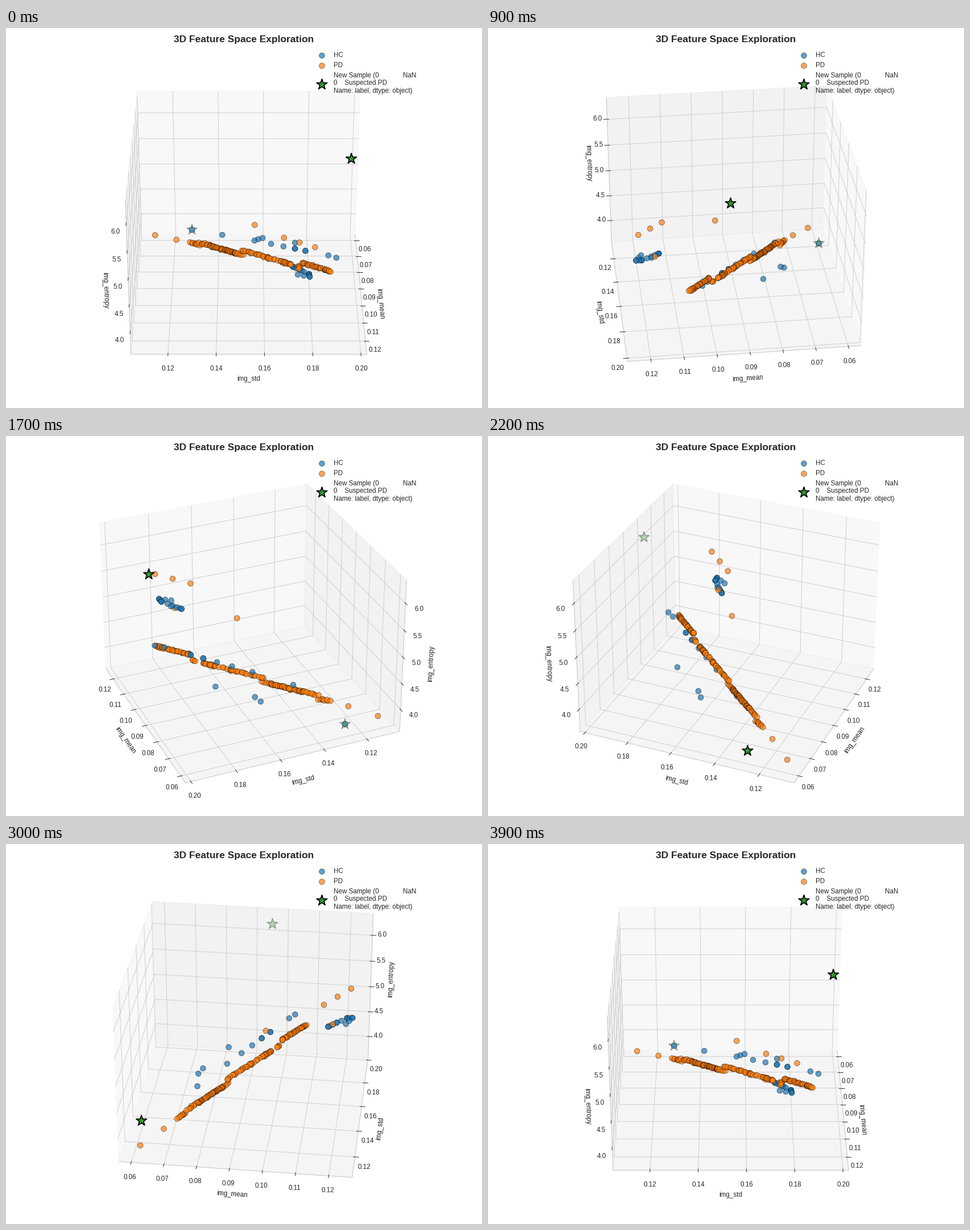
A matplotlib script for the animation above (4000 ms loop, 837 px wide and 669 px high).

```python
import numpy as np
import matplotlib.pyplot as plt
from matplotlib.animation import FuncAnimation

W, H, DPI = 837, 669, 83.7
FRAMES, INTERVAL = 40, 100
SIDE = 625  # side of the square axes in pixels

plt.style.use("seaborn-v0_8-whitegrid")
plt.rcParams["font.family"] = "sans-serif"
plt.rcParams["font.sans-serif"] = ["Liberation Sans", "DejaVu Sans"]

rng = np.random.default_rng(4)


def along(start, end, t):
    a, b = np.array(start), np.array(end)
    return a + np.asarray(t)[:, None] * (b - a)


def line(start, end, count=2, bend=1.0):
    """Regular points from start to end; bend shifts them along the line."""
    return along(start, end, np.linspace(0, 1, count) ** bend)


def band(start, end, count, shape=1.0):
    """Random points between start and end with a little scatter."""
    t = rng.beta(shape, shape, count)
    t[:2] = 0, 1
    noise = rng.normal(0, 1, (count, 3)) * (0.00008, 0.00012, 0.007)
    return along(start, end, t) + noise


# Key points: img_mean, img_std, img_entropy
near_star = (0.0604, 0.1277, 3.806)
far_star = (0.0954, 0.1962, 6.232)
rise_mid, rise_top = (0.0940, 0.1734, 4.493), (0.0964, 0.1777, 4.526)
clump_a, clump_b = (0.1152, 0.1717, 4.832), (0.1208, 0.1782, 4.876)
clump_c = (0.1225, 0.1784, 4.884)

stars = line(near_star, far_star)

healthy = np.vstack([
    line(near_star, (0.0765, 0.1418, 4.207)),
    line((0.0751, 0.1577, 4.076), (0.0764, 0.1596, 4.141)),
    line((0.0833, 0.1737, 4.266), rise_mid),
    line((0.0845, 0.1560, 4.347), rise_top, 5, bend=0.8),
    line(rise_top, (0.1034, 0.1905, 4.618)),
    line((0.1017, 0.1872, 4.608), clump_a),
    line(clump_a, clump_b, 6, bend=1.6),
    line((0.1177, 0.1753, 4.844), clump_b),
    line(clump_b, clump_c, 3),
    line(clump_c, (0.1207, 0.1736, 4.863), 3),
])

patients = np.vstack([
    line((0.0621, 0.1110, 3.748), (0.0682, 0.1210, 3.847)),
    line((0.0967, 0.1560, 5.033), (0.1165, 0.1741, 4.834)),
    line((0.1139, 0.1680, 5.330), (0.1217, 0.1804, 5.405), 3),
    band((0.0717, 0.1273, 3.905), (0.0737, 0.1315, 3.911), 9),
    band((0.0740, 0.1312, 3.974), (0.0853, 0.1510, 4.085), 66, 1.5),
    band((0.0849, 0.1506, 4.168), (0.0971, 0.1716, 4.286), 44),
    band((0.0989, 0.1745, 4.302), (0.0994, 0.1754, 4.303), 4),
    band((0.1003, 0.1765, 4.414), (0.1072, 0.1882, 4.478), 38),
])

fig = plt.figure(figsize=(W / DPI, (H + 0.001) / DPI), dpi=DPI)
ax = fig.add_axes([(W - SIDE) / 2 / W, 12.4 / H, SIDE / W, SIDE / H],
                  projection="3d")

dots = dict(s=70, alpha=0.7, edgecolors="k", linewidths=0.5)
ax.scatter(*healthy.T, c="#1f77b4", label="HC", **dots)
ax.scatter(*patients.T, c="#ff7f0e", label="PD", **dots)
star_label = ("New Sample (0" + " " * 13 + "NaN\n"
              "0    Suspected PD\n"
              "Name: label, dtype: object)")
ax.scatter(*stars.T, c="#2ca02c", marker="*", s=280, edgecolors="k",
           linewidths=1.5, label=star_label)

ax.set_xticks(np.arange(6, 13) / 100)
ax.set_yticks(np.arange(12, 21, 2) / 100)
ax.set_zticks(np.arange(8, 13) / 2)
ax.set_xlim(0.0561, 0.12705)
ax.set_ylim(0.10466, 0.20236)
ax.set_zlim(3.571, 6.417)
ax.set_xlabel("img_mean")
ax.set_ylabel("img_std")
ax.set_zlabel("img_entropy")
ax.legend(loc="upper right", bbox_to_anchor=(1.001, 1))
fig.text(0.5, 1 - 24.8 / H, "3D Feature Space Exploration",
         ha="center", va="baseline", fontsize=15, fontweight="bold")


def update(frame):
    # The last step completes the turn, so the first pose shows twice
    ax.view_init(elev=30, azim=360 * frame / (FRAMES - 1))
    return []


anim = FuncAnimation(fig, update, frames=FRAMES, interval=INTERVAL,
                     repeat=True, repeat_delay=0, blit=False)
plt.show()
```
